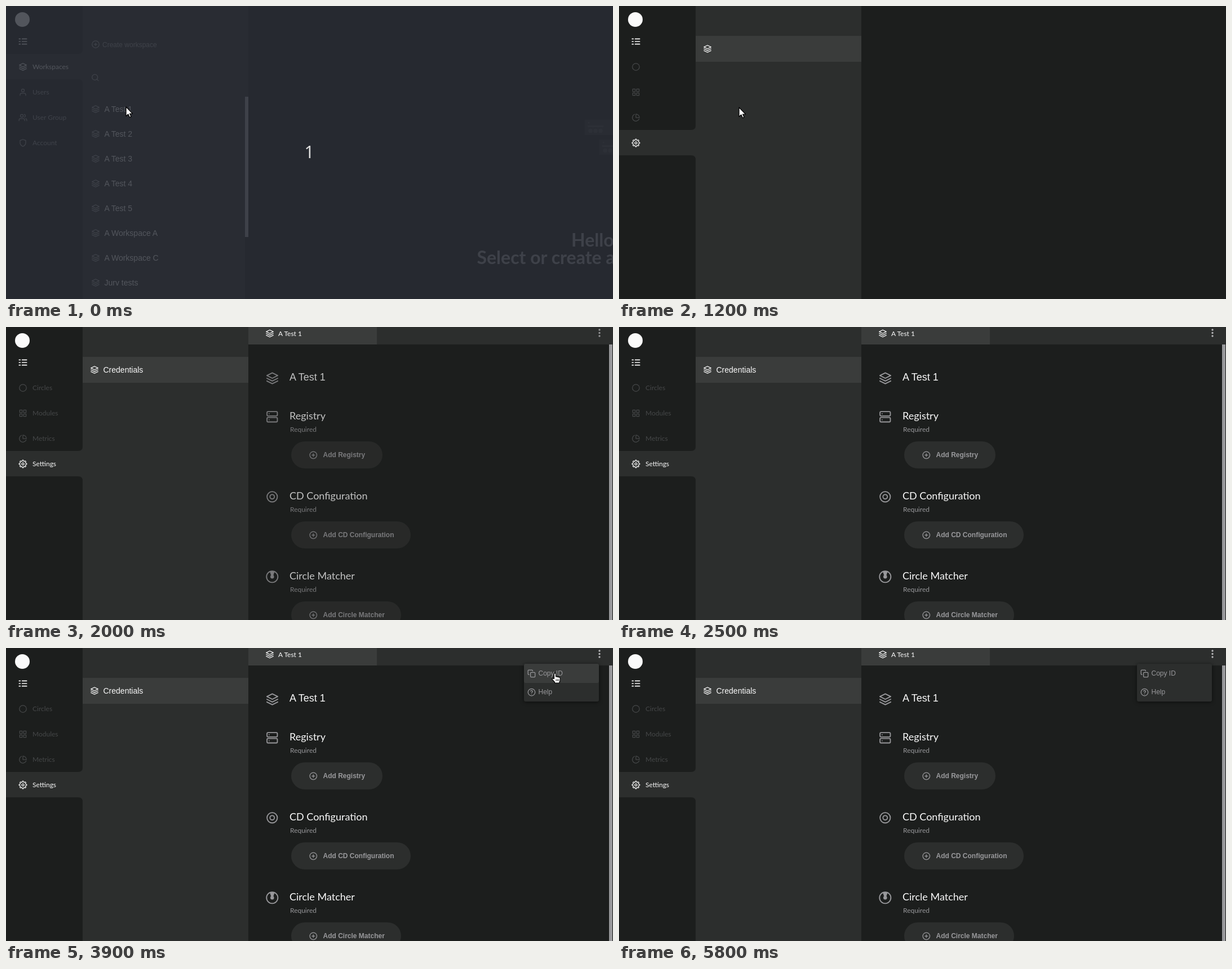
Animation, 1077 px wide and 520 px high, one loop 6.5 s. Source, as an HTML page:

```html
<!DOCTYPE html>
<html lang="en">
<head>
<meta charset="utf-8">
<title>Workspace settings</title>
<style>
  html, body { margin: 0; width: 100%; height: 100%; overflow: hidden; background: #1c1e1d; }
  svg { display: block; }
  #stage { width: 100%; height: 100%; }
  .lato { font-family: Lato, sans-serif; }
  .sans { font-family: "Liberation Sans", Arial, sans-serif; }
  .noto { font-family: "Noto Sans", sans-serif; }
  symbol { fill: none; stroke: currentColor; stroke-width: 2; stroke-linecap: round; stroke-linejoin: round; }
  #menu { filter: drop-shadow(0 1px 3px #0009); }
</style>
</head>
<body>
<svg id="stage" viewBox="0 0 1077 520"></svg>
<script>
const BG = '#1c1e1d', PANEL = '#2c2e2d', RAISED = '#3a3c3b';
const WHITE = '#fafafa', GREY = '#98989b', FAINT = '#454748';

// Icons on a 24 x 24 grid
const gear = Array.from({ length: 96 }, (_, i) => {
  const a = i / 96 * 2 * Math.PI, r = 9.4 + 1.5 * Math.tanh(2.5 * Math.cos(8 * a));
  return `${(12 + r * Math.cos(a)).toFixed(2)} ${(12 + r * Math.sin(a)).toFixed(2)}`;
}).join('L');

const ICONS = {
  layers: '<path d="M12 2L2 7l10 5 10-5zM2 17l10 5 10-5M2 12l10 5 10-5"/>',
  plus: '<circle cx="12" cy="12" r="10"/><path d="M12 8v8M8 12h8"/>',
  search: '<circle cx="11" cy="11" r="8"/><path d="M21 21l-4.35-4.35"/>',
  user: '<path d="M20 21v-2a4 4 0 0 0-4-4H8a4 4 0 0 0-4 4v2"/><circle cx="12" cy="7" r="4"/>',
  users: '<path d="M17 21v-2a4 4 0 0 0-4-4H5a4 4 0 0 0-4 4v2M23 21v-2a4 4 0 0 0-3-3.87M16 3.13a4 4 0 0 1 0 7.75"/><circle cx="9" cy="7" r="4"/>',
  shield: '<path d="M12 22s8-4 8-10V5l-8-3-8 3v7c0 6 8 10 8 10z"/>',
  circle: '<circle cx="12" cy="12" r="10"/>',
  grid: '<path d="M3 3h7v7H3zM14 3h7v7h-7zM14 14h7v7h-7zM3 14h7v7H3z"/>',
  pie: '<path d="M21.2 15.9A10 10 0 1 1 8 2.83M22 12A10 10 0 0 0 12 2v10z"/>',
  gear: `<path d="M${gear}z"/><circle cx="12" cy="12" r="3"/>`,
  list: '<path stroke-width="2.6" d="M2 5h3M10 5h12M2 12h3M10 12h12M2 19h3M10 19h12"/>',
  server: '<rect x="2" y="2" width="20" height="8.5" rx="2"/><rect x="2" y="13.5" width="20" height="8.5" rx="2"/><path d="M6 6.2h.01M6 17.8h.01"/>',
  target: '<circle cx="12" cy="12" r="10"/><circle cx="12" cy="12" r="4.3"/>',
  matcher: '<circle cx="12" cy="12" r="10.5"/><path fill="currentColor" stroke="none" d="M7.5 2h9l-2.6 8h-3.8z"/><circle cx="12" cy="12" r="2.4" fill="currentColor"/>',
  copy: '<rect x="9" y="9" width="13" height="13" rx="2"/><path d="M5 15H4a2 2 0 0 1-2-2V4a2 2 0 0 1 2-2h9a2 2 0 0 1 2 2v1"/>',
  help: '<circle cx="12" cy="12" r="10"/><path d="M9.1 9a3 3 0 0 1 5.8 1c0 2-3 3-3 3M12 17h.01"/>'
};

const rect = (x, y, w, h, fill, extra = '') =>
  `<rect x="${x}" y="${y}" width="${w}" height="${h}" fill="${fill}" ${extra}/>`;
const dot = (x, y, r, fill) => `<circle cx="${x}" cy="${y}" r="${r}" fill="${fill}"/>`;
const icon = (name, cx, cy, color, size = 15, extra = '') =>
  `<use href="#${name}" x="${cx - size / 2}" y="${cy - size / 2}" width="${size}" height="${size}" color="${color}" ${extra}/>`;
const text = (str, x, y, size, fill, font = 'sans', extra = '') =>
  `<text x="${x}" y="${y}" font-size="${size}" fill="${fill}" class="${font}" ${extra}>${str}</text>`;
const group = (id, content) => `<g id="${id}">${content}</g>`;

// Dark sidebar with a notch of the panel colour at the active entry
const sidebar = (top) => rect(0, 0, 430, 520, PANEL) +
  `<path fill="${BG}" d="M0 0H136V${top - 8}q0 8-8 8H0zM0 ${top + 45}H128q8 0 8 8V520H0z"/>` +
  dot(29, 24, 13, WHITE) + icon('list', 30, 63, WHITE, 16);

const navIcons = (items, active, color) => items.map(([name], i) =>
  icon(name, 30, 108 + 45 * i, i === active ? WHITE : color)).join('');
const navLabels = (items, active, color) => items.map(([, label], i) =>
  text(label, 47, 112 + 45 * i, 12, i === active ? WHITE : color, 'lato')).join('');

const placeholder = (x, y) => rect(x, y, 60, 27, PANEL) + dot(x + 7, y + 5, 1.5, '#414342') +
  rect(x + 5, y + 10, 28, 3, '#414342') +
  [10, 19, 28].map(dx => dot(x + dx, y + 19.5, 3.7, '#414342')).join('');

const homeNav = [['layers', 'Workspaces'], ['user', 'Users'], ['users', 'User Group'], ['shield', 'Account']];
const workspaces = ['A Test 1', 'A Test 2', 'A Test 3', 'A Test 4', 'A Test 5',
  'A Workspace A', 'A Workspace C', 'Jurv tests'];

const home = sidebar(85) + navIcons(homeNav, 0, GREY) + navLabels(homeNav, 0, GREY) +
  icon('plus', 159, 68, GREY) + text('Create workspace', 171, 73, 12, GREY) +
  icon('search', 158.3, 127, GREY) +
  workspaces.map((name, i) =>
    icon('layers', 159, 183 + 44 * i, GREY) + text(name, 174.5, 188 + 44 * i, 14, WHITE)).join('') +
  rect(424, 161, 6, 359, BG) + rect(424, 161, 6, 249, GREY) +
  placeholder(1027, 202) + placeholder(1053, 237) +
  text('Hello', 1003, 427, 32, GREY, 'lato', 'font-weight="700"') +
  text('Select or create a', 835.5, 458, 32, GREY, 'lato', 'font-weight="700"');

const settingsNav = [['circle', 'Circles'], ['grid', 'Modules'], ['pie', 'Metrics'], ['gear', 'Settings']];
const sections = [['server', 'Registry', 162], ['target', 'CD Configuration', 212], ['matcher', 'Circle Matcher', 195]];

const section = ([name, title, width], i) => {
  const y = 142 * i;
  return icon(name, 472.3, 159.3 + y, GREY, name === 'matcher' ? 23 : 22) +
    text(title, 503, 164 + y, 18, WHITE, 'lato') +
    text('Required', 504, 186 + y, 12, GREY, 'lato') +
    rect(506, 203 + y, width, 48, PANEL, 'rx="24"') +
    icon('plus', 545.3, 227.3 + y, GREY) +
    text('Add ' + title, 562.5, 231 + y, 12, GREY, 'sans', 'font-weight="700"');
};

const settings = sidebar(220) + navIcons(settingsNav, 3, FAINT) +
  rect(136, 53, 294, 46, RAISED) + icon('layers', 157, 76, WHITE) +
  group('labels', navLabels(settingsNav, 3, FAINT) + text('Credentials', 172.5, 81, 14, WHITE)) +
  group('header', rect(430, 0, 647, 31, PANEL) + rect(430, 0, 228, 31, RAISED) +
    icon('layers', 468, 11.5, WHITE) + text('A Test 1', 483, 16, 12, WHITE, 'lato') +
    rect(1070, 31, 6, 489, GREY)) +
  group('content', icon('layers', 472.5, 91, GREY, 23) + text('A Test 1', 503, 95, 18, WHITE) +
    sections.map(section).join('') + [5, 10.5, 16].map(y => dot(1053, y, 1.7, '#b4b4b6')).join('')) +
  group('menu', rect(919, 28, 133, 67, PANEL, 'rx="3"') +
    rect(919, 28, 133, 34, RAISED, 'id="hover" rx="3"') +
    icon('copy', 932.5, 45.3, GREY, 15, 'id="copyIcon"') + icon('help', 932.5, 78.5, GREY, 15, 'id="helpIcon"') +
    group('menuText', text('Copy ID', 944.5, 49, 12, GREY) + text('Help', 944.5, 82, 12, GREY)));

const outline = 'fill="#fff" stroke="#000" stroke-linejoin="round"';
const cursor = group('cursor',
  `<path id="arrow" ${outline} stroke-width="1.2" d="M0 0V16.5L3.8 13L6.4 18.6L9 17.4L6.5 12H11.6z"/>` +
  group('hand', `<path ${outline} stroke-width="1.2" d="M-1.5 9.5V1.2q0-1.6 1.6-1.6t1.6 1.6V6q1.4-.8 2.6.4q1.5-.6 2.5.6q1.7-.4 2.5 1.2V12q0 2-1.3 3.2V17H-.5V15.5L-4.8 11q-.7-2 1.2-2.1z"/>` +
    '<path stroke="#000" d="M2.2 10.5v3M4.5 10.5v3M6.8 10.5v3"/>'));

const stage = document.getElementById('stage');
stage.innerHTML =
  Object.entries(ICONS).map(([id, shape]) => `<symbol id="${id}" viewBox="0 0 24 24" overflow="visible">${shape}</symbol>`).join('') +
  rect(0, 0, 1077, 520, BG) + group('home', home) + group('settings', settings) +
  group('countdown', rect(0, 0, 1077, 520, '#282c35', 'opacity=".8"') +
    text('1', 538, 270, 30, '#dcdcdc', 'noto', 'text-anchor="middle"')) + cursor;

const el = id => document.getElementById(id);
const show = (id, visible) => el(id).setAttribute('display', visible ? 'inline' : 'none');
const fade = (id, opacity) => el(id).setAttribute('opacity', opacity);
const progress = (t, from, to) => Math.min(1, Math.max(0, (t - from) / (to - from)));

// Pointer stops: time, x, y
const POINTER = [[0, 213, 179], [1200, 213, 180], [1300, 213, 180], [1800, 1090, -24], [2700, 1090, -24],
  [2800, 1053, 10], [3300, 1053, 10], [3600, 1000, 38], [3700, 1000, 38], [3900, 974, 45], [6500, 974, 45]];

function pointerAt(t) {
  const i = POINTER.findIndex(([time]) => time > t);
  const [t0, x0, y0] = POINTER[i - 1], [t1, x1, y1] = POINTER[i];
  const p = progress(t, t0, t1), e = p * p * (3 - 2 * p);
  return [x0 + (x1 - x0) * e, y0 + (y1 - y0) * e];
}

function render(t) {
  show('countdown', t < 500);
  show('home', t < 1200);
  show('settings', t >= 1200);
  show('labels', t >= 1400);
  show('header', t >= 1600);
  fade('content', 1 - (1 - progress(t, 1700, 2500)) ** 3);

  const opening = progress(t, 3000, 3200);
  const scale = 1.05 - 0.05 * opening;
  show('menu', t >= 2900);
  fade('menu', t < 3000 ? 0.4 : 1);
  el('menu').setAttribute('transform', `translate(985.5 61.5) scale(${scale}) translate(-985.5 -61.5)`);
  fade('menuText', 0.2 + 0.8 * opening);
  show('helpIcon', t >= 3000);
  show('copyIcon', t >= 3100);
  show('hover', t >= 3800 && t < 5800);
  fade('hover', t === 3800 || t === 5700 ? 0.5 : 1);

  const isHand = t >= 500 && t < 1200 || t >= 2800;
  show('cursor', t < 1800 || t >= 2800 && t < 5700);
  show('arrow', !isHand);
  show('hand', isHand);
  el('cursor').setAttribute('transform', `translate(${pointerAt(t)})`);
}

const start = performance.now();
function tick() {
  const t = (performance.now() - start) % 6500;
  render(Math.floor(t / 100) * 100);
  requestAnimationFrame(tick);
}
tick();
</script>
</body>
</html>
```
